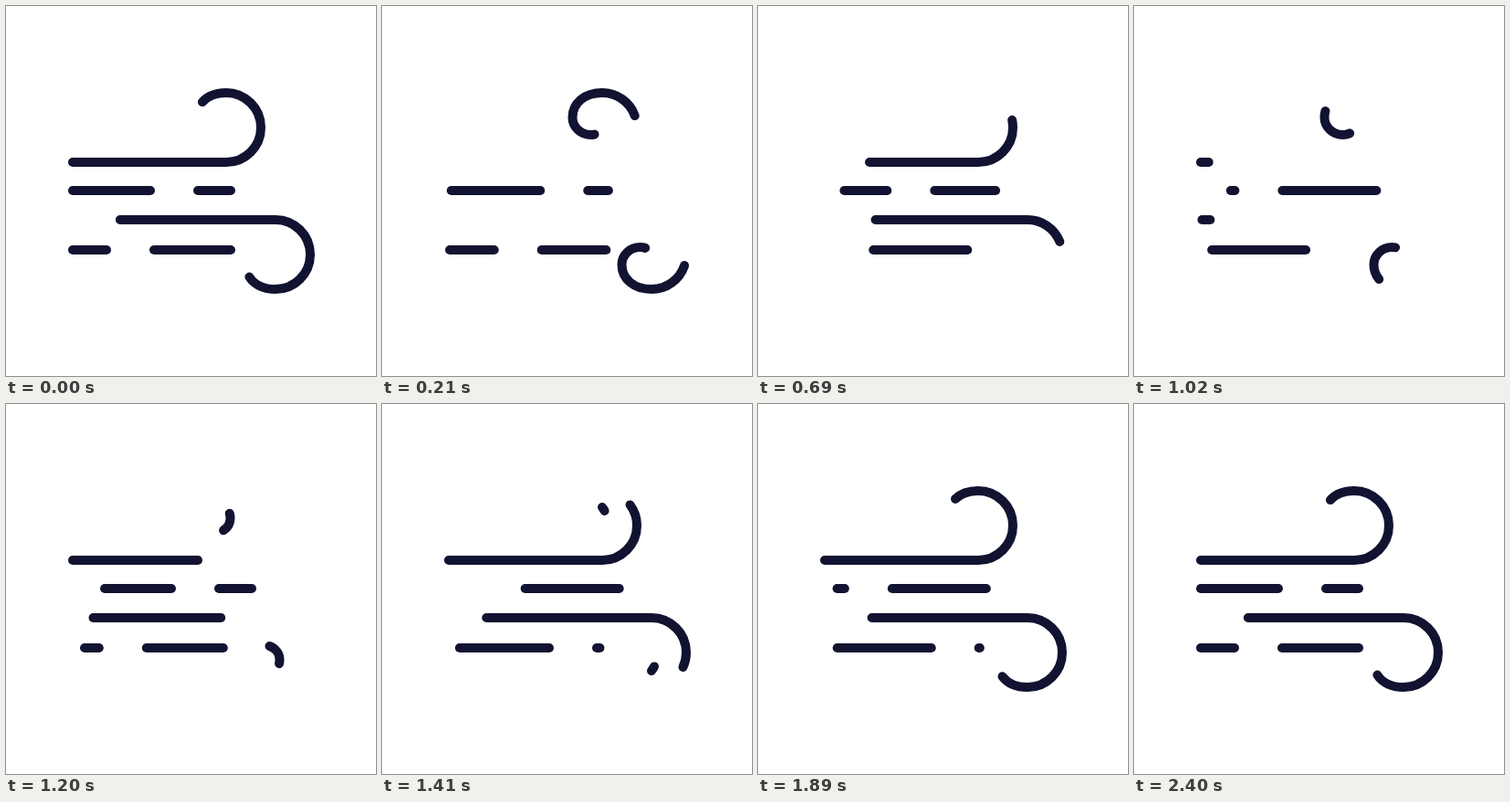
Animation of 405 by 405 pixels, one loop 2.43 s. Source, as an HTML page with a canvas:

```html
<!DOCTYPE html>
<html lang="en">
<head>
<meta charset="utf-8">
<title>Wind</title>
<style>
  html, body { margin: 0; width: 100%; height: 100%; overflow: hidden; background: #fff; }
  canvas { display: block; width: 405px; height: 405px; }
</style>
</head>
<body>
<canvas id="stage" width="405" height="405"></canvas>
<script>
const ctx = document.getElementById('stage').getContext('2d');
const STEP = 30, STEPS = 81;
const LEFT = 73, RIGHT = 246;
const DASH = 103, PERIOD = 155;

const clamp = v => Math.min(1, Math.max(0, v));
const lerp = (a, b, t) => a + (b - a) * t;
const smooth = v => { const x = clamp(v); return x * x * (3 - 2 * x); };

// Quick start, long settle: cubic-bezier(1/3, 0, .06, 1)
function gust(step, start, duration) {
  const x = clamp((step - start) / duration);
  let lo = 0, hi = 1;
  for (let i = 0; i < 24; i++) {
    const s = (lo + hi) / 2, r = 1 - s;
    if (s * r * r + 0.18 * s * s * r + s * s * s < x) lo = s; else hi = s;
  }
  return smooth((lo + hi) / 2);
}

// Straight run into a large arc that winds into a small spiral; flip = -1 mirrors it
function swirl(cx, cy, flip) {
  const path = new Path2D();
  const curve = (...p) => path.bezierCurveTo(
    ...p.map((v, i) => i % 2 ? cy + flip * v : cx + v));
  path.moveTo(LEFT, cy + flip * 38);
  path.lineTo(cx, cy + flip * 38);
  path.arc(cx, cy, 38, flip * Math.PI / 2, -flip * Math.PI / 2, flip > 0);
  curve(-19, -38, -32.5, -27, -32.5, -11);
  curve(-32.5, -0.5, -23.5, 8, -12.5, 8);
  curve(-3, 8, 4.5, 1, 4.5, -8);
  curve(4.5, -12.5, 3, -16.5, 0, -20);
  return { path, length: cx - LEFT + 237 };
}

const winds = [
  { ...swirl(241, 133, 1), restTail: 0, restHead: 0.78 },
  { ...swirl(295, 272, -1), restTail: 0.113, restHead: 0.815 }
];

const streaks = [
  { y: 202, phase: 158, leftShift: 35, rightShift: 23 },
  { y: 267, phase: 110, leftShift: 13, rightShift: -8.2 }
];

function trim({ path, length }, tail, head) {
  const size = (head - tail) * length;
  if (size < 0.2) return;
  ctx.setLineDash([size, 9999]);
  ctx.lineDashOffset = -tail * length;
  ctx.stroke(path);
  ctx.setLineDash([]);
}

function drawWind(wind, step) {
  const { restTail, restHead } = wind;
  const leave = gust(step, 0, 22.5);
  const settle = gust(step, 31, 36);
  trim(wind, lerp(restTail, 1, leave), lerp(restHead, 1, leave));
  trim(wind, gust(step, 17.6, 36), gust(step, 12, 36));
  trim(wind, restTail * settle, restHead * settle);
}

function drawStreak({ y, phase, leftShift, rightShift }, step) {
  const sway = smooth(1 - Math.abs(step - 40) / 40);
  const from = LEFT + leftShift * sway;
  const to = RIGHT + rightShift * sway;
  const end = phase + 4 * PERIOD * smooth(step / 80) + rightShift * sway;
  for (let x = end % PERIOD - PERIOD; x < to + DASH; x += PERIOD) {
    const a = Math.max(from, x - DASH), b = Math.min(to, x);
    if (b <= a) continue;
    ctx.beginPath();
    ctx.moveTo(a, y);
    ctx.lineTo(b, y);
    ctx.stroke();
  }
}

function draw(now) {
  const step = Math.floor(now / STEP) % STEPS;
  ctx.fillStyle = '#fff';
  ctx.fillRect(0, 0, 405, 405);
  ctx.strokeStyle = '#121331';
  ctx.lineWidth = 10;
  ctx.lineCap = ctx.lineJoin = 'round';
  winds.forEach(w => drawWind(w, step));
  streaks.forEach(s => drawStreak(s, step));
}

const began = performance.now();
function tick() {
  draw(performance.now() - began);
  requestAnimationFrame(tick);
}
tick();
</script>
</body>
</html>
```
